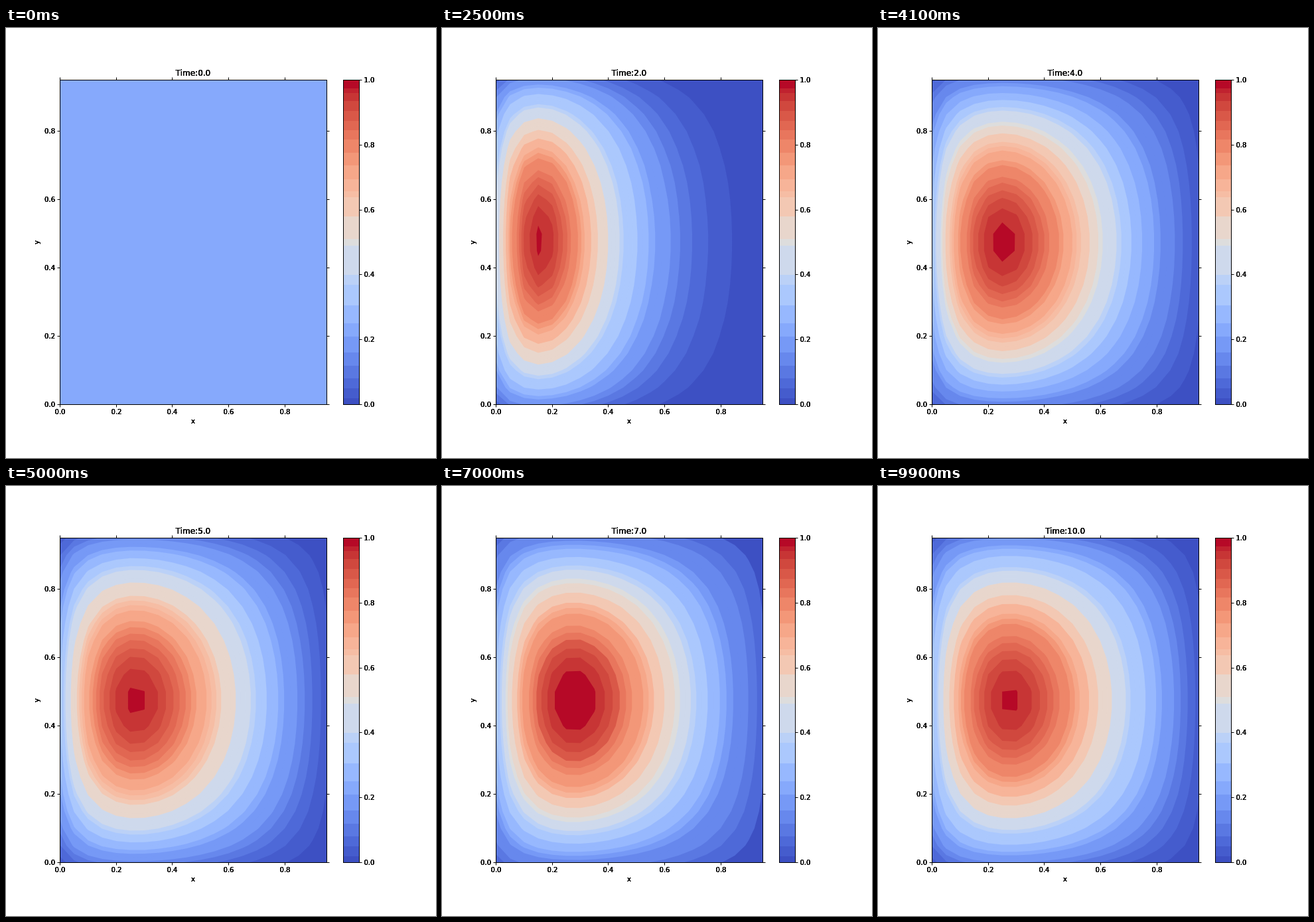
Write an HTML page with a canvas that moves like this. It is 648 px wide and 648 px high and loops after 10 s.

```html
<!DOCTYPE html>
<html lang="en">
<head>
<meta charset="utf-8">
<title>Diffusion contours</title>
<style>
  html, body { margin: 0; width: 100%; height: 100%; overflow: hidden; background: #fff; }
  canvas { display: block; width: 648px; height: 648px; }
</style>
</head>
<body>
<canvas id="stage" width="648" height="648"></canvas>
<script>
const ctx = document.getElementById('stage').getContext('2d');
const N = 20, FRAMES = 100, FRAME_MS = 100;
const BOX = { x: 81.5, y: 78.5, w: 402, h: 489 };
const BAR = { x: 508.5, w: 24 };
const BOTTOM = BOX.y + BOX.h;

// Diverging colour scale, cut into a small set of uneven bins.
const STOPS = [
  [59, 76, 192], [77, 104, 215], [98, 130, 234], [119, 154, 247], [141, 176, 254],
  [163, 194, 255], [184, 208, 249], [204, 217, 238], [221, 221, 221], [236, 211, 197],
  [245, 196, 173], [247, 177, 148], [244, 154, 123], [236, 127, 99], [222, 96, 77],
  [203, 62, 56], [180, 4, 38]
];
const EDGES = [0, .02, .05, .08, .12, .16, .21, .25, .305, .37, .4, .49, .51, .58, .64,
  .657, .695, .737, .777, .816, .845, .875, .905, .935, .96, .975, 1];

function scaleColor(v) {
  const p = v * (STOPS.length - 1);
  const i = Math.min(STOPS.length - 2, Math.floor(p));
  const mix = STOPS[i].map((c, k) => Math.round(c + (STOPS[i + 1][k] - c) * (p - i)));
  return `rgb(${mix})`;
}
const COLORS = EDGES.slice(1).map((e, i) => {
  if (i === 0) return scaleColor(.008);
  if (e === 1) return scaleColor(.995);
  return scaleColor((e + EDGES[i]) / 2);
});
const binColor = v => COLORS[Math.max(0, EDGES.findIndex(e => e > v) - 1)];

// Implicit advection-diffusion; the left wall feeds the field until t = 2.
function simulate() {
  const W = N + 2, dt = .05, h = 1 / N, D = .05, V = .2;
  const side = dt * D / (h * h), drift = dt * V / (2 * h);
  const east = side + drift, west = side - drift, diag = 1 + 4 * side;
  const u = new Float64Array(W * W);
  const frames = [];
  for (let f = 0; f < FRAMES; f++) {
    for (let s = 0; f > 0 && s < 2; s++) {
      for (let j = 2; j <= N; j++) u[j * W] = f <= 20 ? 1 : 0;
      const old = u.slice();
      for (let k = 0; k < 45; k++) {
        for (let j = 1; j <= N; j++) {
          for (let i = 1; i <= N; i++) {
            const c = j * W + i;
            u[c] = (old[c] + east * u[c + 1] + west * u[c - 1] + side * (u[c + W] + u[c - W])) / diag;
          }
        }
      }
    }
    const rows = [];
    for (let j = 1; j <= N; j++) rows.push(Array.from(u.slice(j * W + 1, j * W + N + 1)));
    frames.push({ rows, max: Math.max(...rows.flat()) });
  }
  return frames;
}
const fields = simulate();
const gain = 28.03 * .8 / fields[81].max;

// Smallest round step giving at most 36 bands.
function niceStep(max) {
  const raw = max / 36, base = 10 ** Math.floor(Math.log10(raw));
  return base * [1, 1.5, 2, 2.5, 3, 4, 5, 6, 8, 10].find(m => m * base >= raw);
}

// Adds the part of every grid cell that lies above a level to the path.
function traceAbove(rows, level) {
  const dx = BOX.w / (N - 1), dy = BOX.h / (N - 1);
  for (let j = 0; j < N - 1; j++) {
    for (let i = 0; i < N - 1; i++) {
      const pts = [[i, j], [i + 1, j], [i + 1, j + 1], [i, j + 1]];
      const vals = pts.map(([a, b]) => rows[b][a] - level);
      if (vals.every(v => v < 0)) continue;
      let open = false;
      const add = (a, b) => {
        const x = BOX.x + a * dx, y = BOTTOM - b * dy;
        if (open) ctx.lineTo(x, y); else ctx.moveTo(x, y);
        open = true;
      };
      for (let k = 0; k < 4; k++) {
        const n = (k + 1) % 4, p = pts[k], q = pts[n], v = vals[k], w = vals[n];
        if (v >= 0) add(p[0], p[1]);
        if ((v >= 0) !== (w >= 0)) {
          const r = v / (v - w);
          add(p[0] + (q[0] - p[0]) * r, p[1] + (q[1] - p[1]) * r);
        }
      }
      ctx.closePath();
    }
  }
}

function drawField(f) {
  ctx.fillStyle = f ? binColor(0) : binColor(.24);
  ctx.fillRect(BOX.x, BOX.y, BOX.w, BOX.h);
  if (!f) return;
  const { rows, max } = fields[f];
  const step = niceStep(max * gain) / gain;
  const count = Math.ceil(max / step);
  for (let k = 0; k < count; k++) {
    ctx.beginPath();
    traceAbove(rows, k * step);
    ctx.fillStyle = binColor((k + .5) / count);
    ctx.fill();
  }
}

// Overprinting gives the heavy text edges.
function label(text, x, y, align, size = 10) {
  ctx.font = `${size}px "DejaVu Sans", sans-serif`;
  ctx.textAlign = align;
  ctx.fillStyle = '#000';
  for (let k = 0; k < 4; k++) ctx.fillText(text, x, y);
}

function line(x1, y1, x2, y2) {
  ctx.beginPath();
  ctx.moveTo(x1, y1);
  ctx.lineTo(x2, y2);
  ctx.stroke();
}

function drawAxes() {
  ctx.strokeStyle = '#000';
  ctx.lineWidth = 1;
  ctx.strokeRect(BOX.x, BOX.y, BOX.w, BOX.h);
  const right = BOX.x + BOX.w, snap = v => Math.floor(v) + .5;
  for (let k = 0; k < 5; k++) {
    const text = (k / 5).toFixed(1);
    const x = snap(BOX.x + BOX.w * k * .2 / .95), y = snap(BOTTOM - BOX.h * k * .2 / .95);
    line(x, BOTTOM, x, BOTTOM + 4);
    line(x, BOX.y, x, BOX.y - 4);
    line(BOX.x, y, BOX.x - 4, y);
    line(right, y, right + 4, y);
    label(text, x, 582, 'center');
    label(text, 74, y + 3.5, 'right');
  }
  label('x', 282, 596, 'center');
  ctx.save();
  ctx.translate(50, 323);
  ctx.rotate(-Math.PI / 2);
  label('y', 0, 0, 'center');
  ctx.restore();
}

function drawBar() {
  const end = BAR.x + BAR.w, at = v => Math.round(BOTTOM - BOX.h * v);
  COLORS.forEach((c, i) => {
    ctx.fillStyle = c;
    ctx.fillRect(BAR.x, at(EDGES[i + 1]), BAR.w, at(EDGES[i]) - at(EDGES[i + 1]));
  });
  ctx.strokeRect(BAR.x, BOX.y, BAR.w, BOX.h);
  for (let k = 0; k <= 5; k++) {
    const y = Math.floor(BOTTOM - BOX.h * k / 5) + .5;
    line(end, y, end + 4, y);
    label((k / 5).toFixed(1), 539.5, y + 3.5, 'left');
  }
}

// Whole seconds, halves going to the even number.
function clock(f) {
  const whole = Math.floor(f / 10), rest = f % 10;
  return whole + (rest > 5 || (rest === 5 && whole % 2) ? 1 : 0);
}

function draw(f) {
  ctx.fillStyle = '#fff';
  ctx.fillRect(0, 0, 648, 648);
  drawField(f);
  drawAxes();
  drawBar();
  label(`Time:${clock(f)}.0`, 282, 72, 'center', 12);
}

let shown = -1;
const start = performance.now();
function tick() {
  const f = Math.floor((performance.now() - start) / FRAME_MS) % FRAMES;
  if (f !== shown) draw(shown = f);
  requestAnimationFrame(tick);
}
tick();
</script>
</body>
</html>
```
